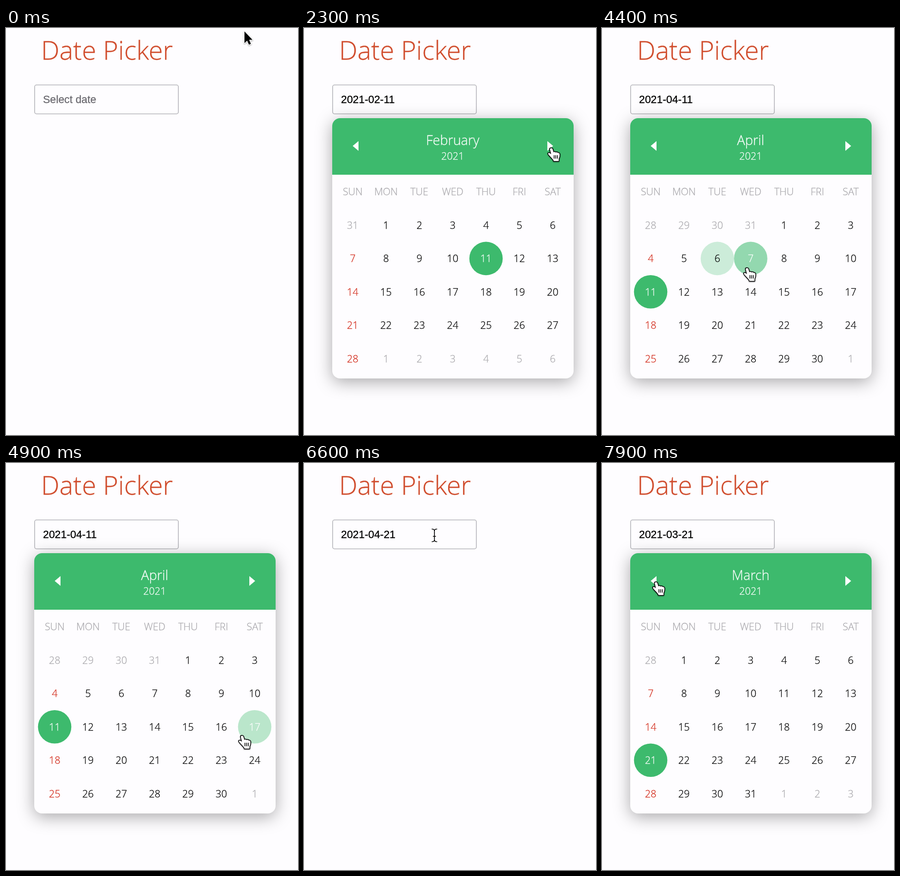
Animation, 600 px wide and 835 px high, one loop 8 s. Source, as an HTML page:

```html
<!DOCTYPE html>
<html lang="en">
<head>
<meta charset="utf-8">
<title>Date Picker</title>
<style>
  html, body { margin: 0; width: 600px; height: 835px; overflow: hidden; background: #fefdff; }
  #field, #panel, svg { position: absolute; box-sizing: border-box; }
  #field {
    left: 58px; top: 116px; width: 297px; height: 61px; border-radius: 5px;
    background: #fefdff; box-shadow: inset 0 0 0 1.6px #b7b7bc;
  }
  #field.focus { box-shadow: inset 0 0 0 3.5px #0a52bd; }
  #panel {
    left: 58px; top: 185px; width: 496px; border-radius: 16px; overflow: hidden;
    background: #fefdff; box-shadow: 0 7px 34px rgba(0, 0, 0, .34);
  }
  #panel::before { content: ""; display: block; height: 116px; background: #3dba6d; }
  svg { left: 0; top: 0; }
  text {
    font: 300 20.5px "Open Sans", sans-serif; color: #000;
    fill: currentColor; stroke: currentColor; stroke-width: .3px;
  }
  #title { font-size: 53.5px; color: #d04c2c; }
  #value { font: 21.9px "Liberation Sans", Arial, sans-serif; }
  #value.empty { color: #6b6a70; }
  #view text { text-anchor: middle; }
  #view .dim { color: #a9a8ac; }
  #view .sun { color: #d22a1a; }
  #view .on { color: #fff; }
  #view .month { font-size: 27.4px; }
  #view circle { fill: #3dba6d; }
  #arrow, #hand { filter: drop-shadow(0 1.5px 1px rgba(0, 0, 0, .35)); }
  #cursor path { stroke-linejoin: round; stroke-linecap: round; paint-order: stroke; }
</style>
</head>
<body>
<div id="field"></div>
<div id="panel"></div>
<svg width="600" height="835">
  <text id="title" x="72" y="65.3">Date Picker</text>
  <text id="value" x="76" y="154"></text>
  <g id="view"></g>
  <g id="cursor">
    <g id="arrow">
      <path d="M0 0V24L5.5 18.9 9.2 27.3 13.2 25.6 9.6 17.3H16.5Z" fill="#000" stroke="#fff" stroke-width="3"/>
    </g>
    <g id="hand">
      <path d="M-2.6 1.8C-3-.8 1.6-1.6 2.6 1L4.8 8C6 6.6 9 7 9.4 8.6 11 7.4 13.2 8 13.6 9.6 15.4 8.8 17 10 17.2 12 17.6 16 16.6 19 15.6 21L15.4 26H5L4.6 24C2 21-1 18-4 14.6-6 12-7.4 10.4-5.4 9.4-3.6 8.8-2 10.6-.2 12Z" fill="#fff" stroke="#000" stroke-width="3"/>
      <path d="M6 14.5v6M9.4 14.5v6M12.8 14.5v6" fill="none" stroke="#000" stroke-width="1.5"/>
    </g>
    <g id="beam">
      <path d="M-5-13Q0-13 0-9Q0-13 5-13M0-9V9M-5 13Q0 13 0 9Q0 13 5 13M-2.5 2H2.5" fill="none" stroke="#000" stroke-width="1.6"/>
    </g>
  </g>
</svg>
<script>
const LOOP = 8000, STEP = 100, FADE = 300;
const LEFT = 100, TOP = 404.5, COL = 68.5, ROW = 68.4, RADIUS = 34.3;
const MONTHS = ["January", "February", "March", "April"];
const DAYS = ["SUN", "MON", "TUE", "WED", "THU", "FRI", "SAT"];
const $ = id => document.getElementById(id);

// time, open, month, selected day, field focused, field filled
const STATES = [
  [0, false, 0, 11, false, false],
  [800, true, 0, 11, true, false],
  [2000, true, 1, 11, false, true],
  [2700, true, 2, 11, false, true],
  [3200, true, 3, 11, false, true],
  [5500, false, 3, 21, false, true],
  [6800, true, 3, 21, true, true],
  [7700, true, 2, 21, false, true]
];

// time, x, y of the pointer's hot spot
const PATH = [
  [0, 490, 7], [600, 262, 148], [900, 258, 152], [1200, 254, 213],
  [1700, 508, 247], [3450, 508, 247], [3720, 503, 400], [4010, 255, 466],
  [4130, 250, 480], [4350, 298, 493], [4420, 298, 493], [4750, 505, 505],
  [4900, 485, 560], [5250, 322, 620], [5500, 322, 626], [5700, 322, 620],
  [6500, 268, 148.5], [6850, 268, 148.5], [7400, 111, 245], [8000, 111, 245]
];

const smooth = p => p * p * (3 - 2 * p);

function stateAt(t) {
  const [, open, month, day, focus, filled] = STATES.filter(s => s[0] <= t).pop();
  return { open, month, day, focus, filled };
}

function pointerAt(t) {
  const i = Math.max(1, PATH.findIndex(p => p[0] > t));
  const [t0, x0, y0] = PATH[i - 1], [t1, x1, y1] = PATH[i];
  const k = smooth((t - t0) / (t1 - t0));
  return [x0 + (x1 - x0) * k, y0 + (y1 - y0) * k];
}

function monthInfo(month) {
  const first = new Date(2021, month, 1).getDay();
  const count = new Date(2021, month + 1, 0).getDate();
  const before = new Date(2021, month, 0).getDate();
  return { first, count, before, rows: Math.ceil((first + count) / 7) };
}

// Day of the open month under the pointer, or 0
function dayUnder(t) {
  const { open, month } = stateAt(t);
  if (!open) return 0;
  const [x, y] = pointerAt(t);
  const col = Math.round((x - LEFT) / COL), row = Math.round((y - TOP) / ROW);
  if (col < 0 || col > 6 || row < 0) return 0;
  const { first, count } = monthInfo(month);
  const day = row * 7 + col - first + 1;
  return day > 0 && day <= count ? day : 0;
}

function hoverLevels(t) {
  const levels = {}, dt = 20;
  for (let s = Math.max(0, t - 800); s < t; s += dt) {
    const day = dayUnder(s);
    if (day) levels[day] = levels[day] || 0;
    for (const d in levels) {
      const change = +d === day ? dt / FADE : -dt / FADE;
      levels[d] = Math.min(1, Math.max(0, levels[d] + change));
    }
  }
  return levels;
}

const label = (x, y, cls, str) => `<text x="${x}" y="${y}" class="${cls}">${str}</text>`;

function drawMonth(t, { month, day: chosen }) {
  const { first, count, before, rows } = monthInfo(month);
  const hovered = dayUnder(t), levels = hoverLevels(t);
  let out = '<path d="M100 242L112 232V252ZM512 242L500 232V252Z" fill="#fff"/>' +
    label(305.5, 240, "month on", MONTHS[month]) + label(305.5, 270, "on", 2021);
  DAYS.forEach((name, c) => out += label(LEFT + COL * c, 342.5, "dim", name));
  for (let i = 0; i < rows * 7; i++) {
    const x = LEFT + COL * (i % 7), y = TOP + ROW * Math.floor(i / 7);
    const day = i - first + 1;
    if (day < 1 || day > count) {
      out += label(x, y + 7.5, "dim", day < 1 ? before + day : day - count);
      continue;
    }
    const alpha = day === chosen ? 1 : smooth(levels[day] || 0);
    if (alpha) out += `<circle cx="${x}" cy="${y}" r="${RADIUS}" opacity="${alpha}"/>`;
    const lit = day === chosen || day === hovered;
    out += label(x, y + 7.5, lit ? "on" : i % 7 ? "" : "sun", day);
  }
  $("view").innerHTML = out;
  $("panel").style.height = (rows === 6 ? 604 : 534) + "px";
}

function cursorKind(t, open, x, y) {
  if (x > 58 && x < 355 && y > 116 && y < 177) return "beam";
  const onArrow = open && y > 215 && y < 270 && (Math.abs(x - 106) < 30 || Math.abs(x - 506) < 30);
  return onArrow || dayUnder(t) ? "hand" : "arrow";
}

function draw(t) {
  const state = stateAt(t), [x, y] = pointerAt(t);
  const date = `2021-0${state.month + 1}-${state.day}`;
  $("field").className = state.focus ? "focus" : "";
  $("value").textContent = state.filled ? date : "Select date";
  $("value").setAttribute("class", state.filled ? "" : "empty");
  $("panel").style.display = $("view").style.display = state.open ? "" : "none";
  if (state.open) drawMonth(t, state);
  const kind = cursorKind(t, state.open, x, y);
  for (const id of ["arrow", "hand", "beam"]) $(id).style.display = id === kind ? "" : "none";
  $("cursor").setAttribute("transform", `translate(${x} ${y})`);
}

let shown = -1;
const start = performance.now();
function tick() {
  const t = Math.floor((performance.now() - start) % LOOP / STEP) * STEP;
  if (t !== shown) draw(shown = t);
  requestAnimationFrame(tick);
}
tick();
</script>
</body>
</html>
```
